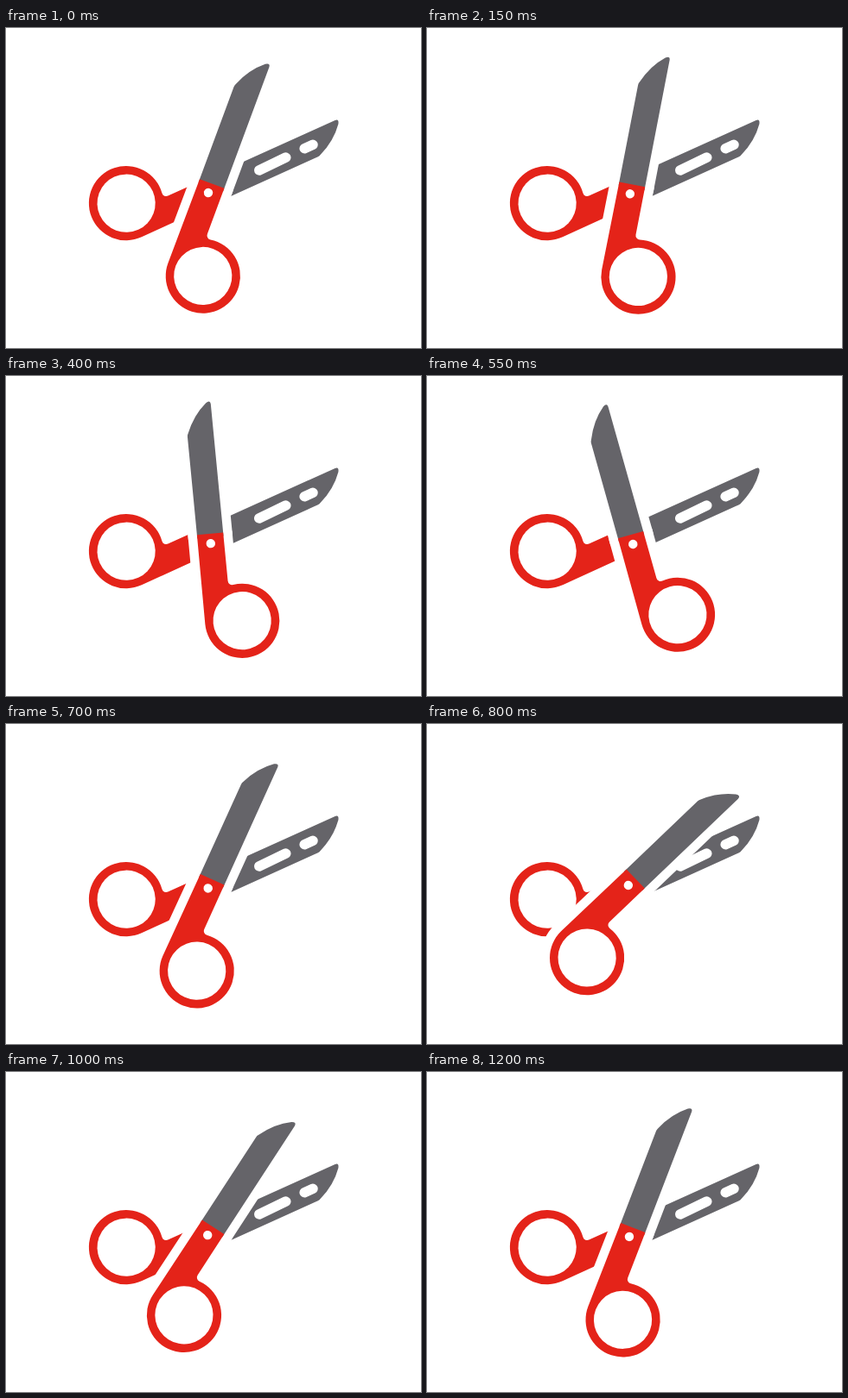
Write an HTML page that moves like this. It is 480 px wide and 371 px high and loops after 1250 ms.

```html
<!DOCTYPE html>
<html lang="en">
<head>
<meta charset="utf-8">
<title>Scissors</title>
<style>
  html, body { margin: 0; height: 100%; overflow: hidden; background: #fff; }
  svg { display: block; width: 100vw; height: 100vh; }
  .red { fill: #e42319; }
  .gray { fill: #656469; }
  .white { fill: #fff; }
  .gap { stroke: #fff; stroke-width: 21; stroke-linejoin: round; }
  .slots { stroke: #fff; stroke-width: 11.6; stroke-linecap: round; }
</style>
</head>
<body>
<svg viewBox="0 0 480 371">
  <defs>
    <path id="handle" d="M-21-4.2H9.4V52.2A5 5 0 0 0 15.1 57.2A43.1 43.1 0 1 1-21.5 99.7Z"/>
    <path id="blade" d="M-21 0V-118.5q0-2 1-3.7Q-11.5-143 4-155.7Q9.1-159 9.4-154V0Z"/>
    <circle id="eye" cx="21.5" cy="99.7" r="33.6"/>
  </defs>
  <g transform="translate(238.8 181.6) rotate(65.6) scale(-1 1)">
    <use href="#blade" y="-6" class="gray"/>
    <use href="#handle" class="red"/>
    <use href="#eye" class="white"/>
  </g>
  <path class="slots" d="M292.8 164.9L323.7 150.1M345.2 139.7L355 135.3"/>
  <g id="lever">
    <g class="white gap">
      <use href="#blade"/>
      <use href="#handle"/>
    </g>
    <use href="#blade" class="gray"/>
    <use href="#handle" class="red"/>
    <use href="#eye" class="white"/>
    <circle class="white" cx="-6.1" cy="7.1" r="5.2"/>
  </g>
</svg>
<script>
  const LOOP = 1250, STEP = 50, REST = 20.3;
  // [time in ms, opening angle in degrees]
  const keys = [[0, 0], [250, 15.6], [550, 36], [750, -17.4], [800, -25.9],
                [1000, -12.7], [1200, -0.7], [LOOP, 0]];
  const lever = document.getElementById("lever");

  function angleAt(t) {
    const i = keys.findIndex(([time]) => time > t);
    const [t0, a0] = keys[i - 1], [t1, a1] = keys[i];
    return a0 + (a1 - a0) * (t - t0) / (t1 - t0);
  }

  function draw(now) {
    const t = Math.floor((now % LOOP) / STEP) * STEP;
    lever.setAttribute("transform", `translate(242.2 186.5) rotate(${REST - angleAt(t)})`);
    requestAnimationFrame(draw);
  }
  draw(performance.now());
</script>
</body>
</html>
```
